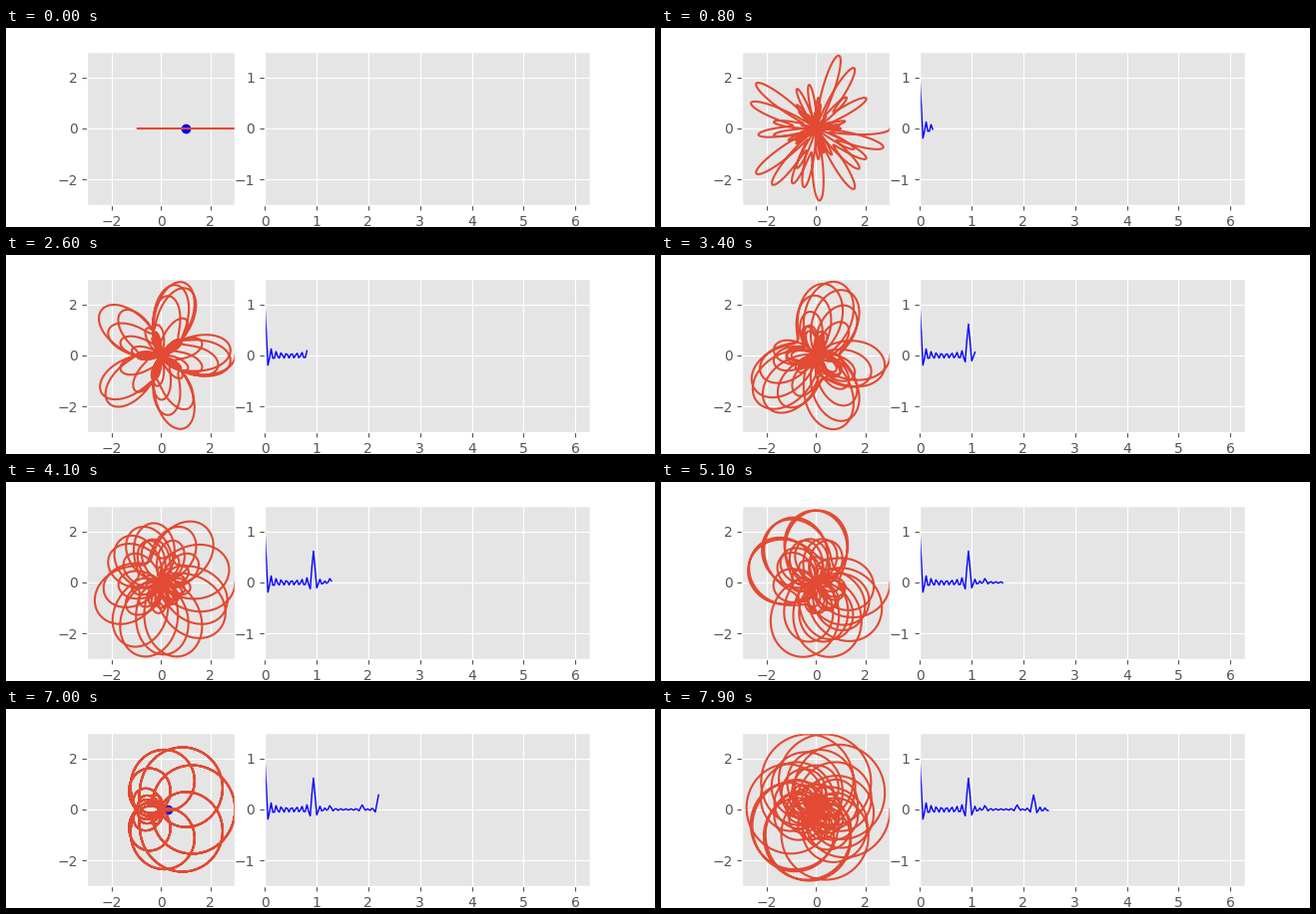
A matplotlib script for the animation above (8 s loop, 650x200 px).

```python
import numpy as np
import matplotlib.pyplot as plt
from matplotlib.animation import FuncAnimation
from matplotlib.gridspec import GridSpec

FRAMES = 80
STEP = 2 * np.pi / 200

plt.style.use("ggplot")

t = np.linspace(0, 20 * np.pi, 5000)
signal = 1 + np.cos(0.3 * np.pi * t) + np.cos(np.pi * t)


def wind(omega):
    """Wrap the signal around the origin at angular speed omega."""
    return signal * np.exp(-1j * omega * t)


def centroid(path):
    """Centre of mass of the path, treated as a uniform wire."""
    length = np.abs(np.diff(path))
    middle = (path[1:] + path[:-1]) / 2
    return (middle * length).sum() / length.sum()


omegas = STEP * np.arange(FRAMES)
paths = [wind(w) for w in omegas]
centers = np.array([centroid(p) for p in paths])

fig = plt.figure(figsize=(6.5, 2), dpi=100)
grid = GridSpec(1, 3, figure=fig)

ax_wind = fig.add_subplot(grid[0])
ax_wind.set(xlim=(-3, 3), ylim=(-3, 3))
curve, = ax_wind.plot([], [])
dot, = ax_wind.plot([], [], "bo", zorder=1.5)

ax_freq = fig.add_subplot(grid[1:])
ax_freq.set(xlim=(0, 2 * np.pi), ylim=(-1.5, 1.5))
trace, = ax_freq.plot([], [], "b", lw=1)


def update(i):
    curve.set_data(paths[i].real, paths[i].imag)
    dot.set_data([centers[i].real], [centers[i].imag])
    trace.set_data(omegas[:i + 1], centers[:i + 1].real)
    return curve, dot, trace


anim = FuncAnimation(fig, update, frames=FRAMES, interval=100,
                     repeat=True, repeat_delay=0)
plt.show()
```
